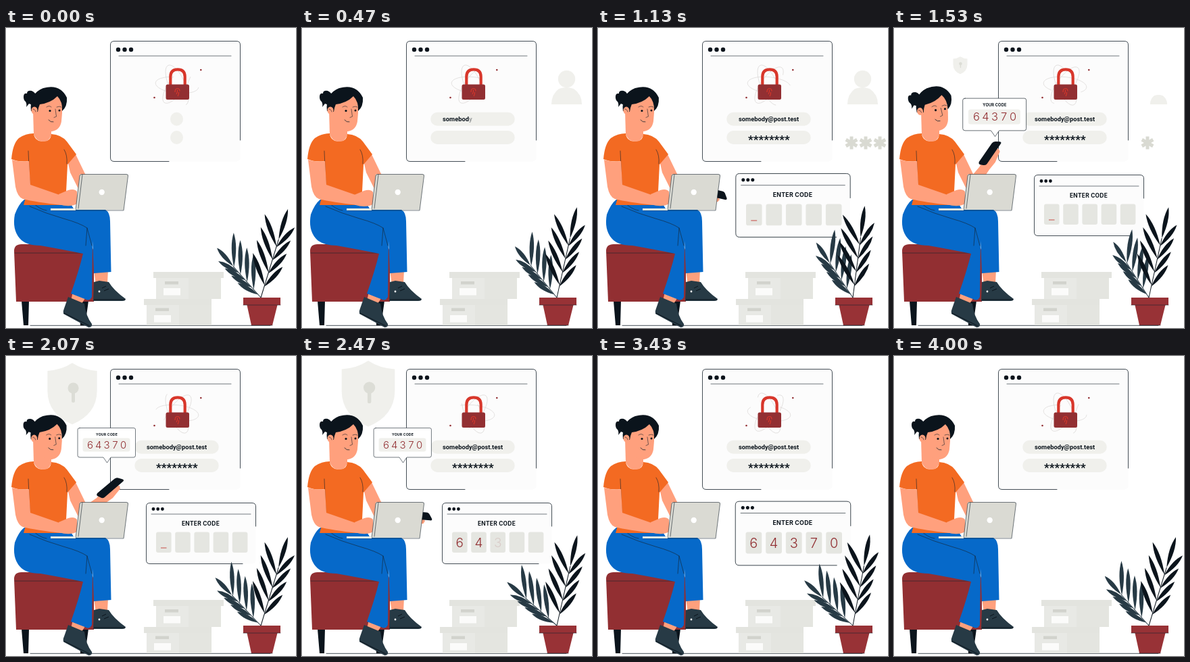
An HTML page for the animation above (4030 ms loop, 429 by 444 pixels).

```html
<!DOCTYPE html>
<html lang="en">
<head>
<meta charset="utf-8">
<title>Two-step sign in</title>
<style>
  html, body { margin: 0; width: 100%; height: 100%; overflow: hidden; background: #fff; }
  svg { display: block; width: 429px; height: 444px; }
  .line { fill: none; stroke: #17232c; stroke-width: .8; stroke-linecap: round; stroke-linejoin: round; }
  .fine { stroke-width: .6; }
  .ink { fill: #0b141c; }
  .skin { fill: #ffa07d; }
  .shirt { fill: #f36a22; }
  .jeans { fill: #0669c9; }
  .shoe { fill: #273a45; }
  .red { fill: #922f32; }
  .soft { fill: #f0f0ec; }
  .cell { fill: #e5e6e1; }
  .title { font: 700 8.4px Inter, "Open Sans", sans-serif; letter-spacing: .03em; fill: #0b141c; text-anchor: middle; }
  .field { font: 700 9.3px Roboto, Inter, sans-serif; fill: #0b141c; }
  .stars { font-size: 17px; }
  .digit { font: 300 15px Inter, Lato, sans-serif; fill: #922f32; text-anchor: middle; }
</style>
</head>
<body>
<svg viewBox="0 0 429 444" xmlns="http://www.w3.org/2000/svg">
  <path class="line" d="M36 440.3H391"/>

  <g id="shield">
    <path class="soft" d="M98 10.500Q114 21 134.500 22V52Q134 86 98 101Q62 86 61.500 52V22Q82 21 98 10.500Z"/>
    <circle cx="99.500" cy="47.500" r="8" fill="#dcddd6"/>
    <rect x="97" y="52" width="5" height="17" rx="2.500" fill="#dcddd6"/>
  </g>

  <circle id="userHead" class="soft" cx="391.500" cy="75.500" r="12.700"/>
  <path id="userBody" class="soft" d="M369 113Q369 98 380 90Q391 86 402 90Q414 98 414 113Z"/>
  <g id="bigStars" fill="none" stroke="#d9dad2" stroke-width="5"></g>

  <g id="login">
    <rect x="154.500" y="19.500" width="192" height="178" rx="5" fill="#fcfcfc"/>
    <path class="line" d="M241 197.500H160Q154.500 197.500 154.500 192V25Q154.500 19.500 160 19.500H341Q346.500 19.500 346.500 25V166"/>
    <path class="line fine" d="M167 41.300H333"/>
    <g class="ink"><circle cx="166" cy="32" r="3.200"/><circle cx="175.500" cy="32" r="3.200"/><circle cx="185" cy="32" r="3.200"/></g>
    <g id="orbits" fill="none" stroke="#d6d3d1" stroke-width=".6"></g>
    <circle class="red" cx="288.300" cy="62" r="1.300"/><circle class="red" cx="219.500" cy="103" r="1.300"/>
    <path d="M243.300 85V72Q243.300 61.300 254 61.300T264.700 72V85" fill="none" stroke="#d8372b" stroke-width="4.200"/>
    <rect class="red" x="236.500" y="83.500" width="34.500" height="22.500" rx="2.500"/>
    <path d="M250 95Q250 89.500 253.500 89.500T257 93.500M252 98Q254 95 253.500 91.500M254 101Q256 98 255.500 95" fill="none" stroke="#d8372b" stroke-width="1.200"/>
    <rect id="pill0" class="soft" y="124.700" height="20" rx="10"/>
    <rect id="pill1" class="soft" y="152" height="20" rx="10"/>
    <text id="mail" class="field" x="208" y="138"></text>
    <text id="stars" class="field stars" x="222" y="171"></text>
  </g>

  <g id="codePanel">
    <rect x="207.500" y="217.500" width="162" height="90" rx="5" fill="#fcfcfc"/>
    <path class="line" d="M350 307.500H213Q207.500 307.500 207.500 302V223Q207.500 217.500 213 217.500H364Q369.500 217.500 369.500 223V252"/>
    <path class="line fine" d="M215 234H362"/>
    <g class="ink"><circle cx="218" cy="226.500" r="2.400"/><circle cx="224.700" cy="226.500" r="2.400"/><circle cx="231.400" cy="226.500" r="2.400"/></g>
    <text class="title" x="288" y="250.700">ENTER CODE</text>
    <g id="cells"></g>
    <path id="cursor" d="M229 284H237.500" stroke="#c23b35" stroke-width=".9"/>
  </g>

  <g fill="#e8e9e5">
    <path d="M222 369H318V401H222Z"/><path d="M208 409H304V440H208Z"/>
    <path d="M270 369H318V401H270ZM256 409H304V440H256Z" fill="#e4e5e0"/>
    <path d="M218 361H322V370H218ZM204 401H304V410H204Z" fill="#e3e4df"/>
    <path d="M235 375H255V379.500H235ZM221 414.500H241V419H221Z" fill="#d2d3cd"/>
    <path d="M233 385H258V395.500H233ZM219 425H244V435.500H219Z" fill="#fbfbfa"/>
  </g>

  <g id="slateFrond"></g>
  <g id="blackFrond"></g>
  <path d="M356 408H402L394 440H363Z" fill="#983236"/>
  <path d="M351 399H406V410H351Z" fill="#983236"/>
  <path class="line fine" d="M351 410H406M363 440H394"/>

  <path class="ink" d="M23 404H34L33 440H26ZM108 404H122L117 440H110Z"/>
  <path class="red" d="M12 330Q12 320 23 320H118Q130 322 130 334V405H15Z"/>
  <path class="line fine" d="M13 333H112"/>

  <path class="skin" d="M88 183L103 187L118 218L108 240L95 214Z"/>
  <g id="phoneArm">
    <path class="skin" d="M104 232L127 205L134 190L145 180L155 179L157 183L150 199L141 210L118 244Z"/>
    <path class="ink" d="M126 198L145 171Q147 168 151 168.300L157 168.500Q160 169 158 172L138 201Q136 204 132 203L127 202Q125 201 126 198Z"/>
    <path d="M149 189L154 183M145 195L150 190M141 201L146 196" stroke="#ffa07d" stroke-width="3.500" stroke-linecap="round"/>
  </g>

  <path class="skin" d="M130 358H151L150 378L133 381ZM99 390L119 397L112 408L96 404Z"/>
  <path class="shoe" d="M130 376L138 374L152 376Q159 388 177 401Q177 404 172 404H129Z"/>
  <path class="shoe" d="M92 398L116 408Q118 426 127 438Q128 443 122 443L85 423Q84 419 86 415Z"/>
  <path d="M130 402H176M86 422L124 441M142 385L148 382M145 389L152 386" stroke="#0b141c" fill="none" stroke-width="1"/>
  <circle cx="138" cy="390" r="1.400" fill="#fff"/>
  <path class="jeans" d="M27 254H92L101 269H147Q154 273 154 286L155.500 361L130 363L128 315L127 398Q124 404 119 402L96 393Q107 362 114 334Q85 328 51 322Q29 322 20 311Q9 298 13 276Q19 260 27 254Z"/>
  <path class="line fine" d="M35 264Q60 275 85 282T120 296L127 322M38 257Q50 269 60 270M120 296L118 322"/>

  <path class="skin" d="M40 122H67V158Q64 169 54 168T41 157Z"/>
  <path class="shirt" d="M41 156Q42 167 54 168T67 157Q82 158 90 168L104 187L91 202L88 262H26L34 233L33 197Q20 199 8 194Q10 171 19 163Q29 156 41 156Z"/>
  <path class="line fine" d="M33 182L35 230M86 180Q91 188 90 201"/>
  <path class="skin" d="M9 195Q22 199 34 197L36 232L82 248V262Q45 258 25 253Q17 250 14 235Z"/>
  <path id="hand" class="skin" d="M78 246L92 240Q101 237 105 242V260Q95 266 78 261Z"/>

  <g id="head">
    <path class="ink" d="M26 102Q26 96 31 97Q31 92 38 93Q44 95 45 103L42 110Q40 115 34 112L30 117Q31 112 29 109Q26 107 26 102Z"/>
    <path class="skin" d="M41 113L80 99Q85 113 82 138Q80 151 68 153Q53 153 46 141Z"/>
    <path class="ink" d="M37 123Q34 97 55 89Q80 82 90 103Q91 116 83 123Q84 109 76 101Q66 111 50 113Q48 117 47 124Z"/>
    <ellipse class="skin" cx="42" cy="122" rx="4.500" ry="5.500"/>
    <path class="line fine" d="M60 117Q64 114 67 117M75 117Q79 115 82 117M73 120L74.500 131L71 132.500M40 120Q43 120 44 124"/>
    <path class="line" d="M63 136Q66 140 70 139"/>
    <circle class="ink" cx="65" cy="122.500" r="1.600"/><circle class="ink" cx="79" cy="122" r="1.500"/>
  </g>

  <path d="M109 216.500H178Q181 216.500 180.500 219L174 269H103Z" fill="#dadad3"/>
  <path class="line fine" d="M103 269L109 219Q109.500 216.500 112 216.500H178Q181 216.500 180.500 219L174 270H67"/>
  <path class="line fine" d="M107 267L113 217"/>
  <path d="M66 267H103V270H66Z" fill="#e9e9e5"/>
  <circle cx="141.700" cy="243" r="4.200" fill="#fff"/>

  <g id="bubble">
    <path class="line fine" style="fill:#fff" d="M109 106.500H189Q191.500 106.500 191.500 109V147Q191.500 150 189 150H155L149.500 158L144 150H109Q106 150 106 147V109Q106 106.500 109 106.500Z"/>
    <text class="title" style="font-size:5.200px" x="149" y="117.500">YOUR CODE</text>
    <rect class="soft" x="113.500" y="121.500" width="70" height="20" rx="3"/>
    <g id="bubbleDigits"></g>
  </g>
</svg>
<script>
  const LOOP = 4030, CODE = "64370";
  const $ = id => document.getElementById(id);
  const clamp = v => Math.min(1, Math.max(0, v));
  const progress = (t, from, to) => clamp((t - from) / (to - from));
  const smooth = p => p * p * (3 - 2 * p);
  const backIn = (p, c) => (c + 1) * p ** 3 - c * p * p;
  const backOut = (p, c) => 1 - backIn(1 - p, c);

  function add(parent, tag, attrs, text = "") {
    const node = document.createElementNS("http://www.w3.org/2000/svg", tag);
    for (const key in attrs) node.setAttribute(key, attrs[key]);
    node.textContent = text;
    return parent.appendChild(node);
  }

  function scaleAt(node, x, y, s) {
    node.style.display = s > 0.01 ? "" : "none";
    node.setAttribute("transform", `translate(${x} ${y}) scale(${s}) translate(${-x} ${-y})`);
  }

  const rotateAt = (node, angle, x, y) => node.setAttribute("transform", `rotate(${angle} ${x} ${y})`);

  // Pop in during [a, b], pop out during [c, d].
  function pop(t, a, b, c, d, strength = 1.7) {
    return t < c ? backOut(progress(t, a, b), strength) : 1 - backIn(progress(t, c, d), strength);
  }

  // A smooth closed curve through [time, value] points.
  function cyclic(points, t) {
    const n = points.length;
    const at = i => [points[(i + n) % n][0] + LOOP * Math.floor(i / n), points[(i + n) % n][1]];
    const i = points.findLastIndex(p => p[0] <= t);
    const [a, b, c, d] = [at(i - 1), at(i), at(i + 1), at(i + 2)];
    const span = c[0] - b[0], p = (t - b[0]) / span;
    const m = (c[1] - a[1]) / (c[0] - a[0]) * span, k = (d[1] - b[1]) / (d[0] - b[0]) * span;
    return b[1] * (1 + 2 * p) * (1 - p) ** 2 + m * p * (1 - p) ** 2 + c[1] * p * p * (3 - 2 * p) + k * p * p * (p - 1);
  }

  // Leaves are [lowest, highest, length, angle] per side, measured along an upright stem.
  function buildFrond(group, color, { stem, pairs, left, right, top }) {
    const leaf = (y, length, angle) => add(group, "path", {
      d: `M0 0Q6.500 ${-length * 0.6} 0 ${-length}Q-6.500 ${-length * 0.6} 0 0Z`,
      transform: `translate(0 ${-y}) rotate(${angle})`, fill: color
    });
    add(group, "path", { d: `M0 0V${-stem}`, stroke: color, "stroke-width": 1 });
    for (const [low, high, length, angle] of [left, right])
      for (let i = 0; i < pairs; i++) leaf(low + (high - low) * i / (pairs - 1), length, angle);
    leaf(stem, top, 0);
  }

  function typed(node, text) {
    return [...text].map(ch => add(node, "tspan", {}, ch));
  }
  function reveal(chars, t, start, step) {
    chars.forEach((ch, i) => ch.setAttribute("fill-opacity", progress(t, start + i * step, start + (i + 1) * step)));
  }

  buildFrond($("blackFrond"), "#0b141c", { stem: 90, pairs: 4, left: [19, 79, 51, -37], right: [17, 78, 40, 26], top: 47 });
  buildFrond($("slateFrond"), "#273a45", { stem: 62, pairs: 4, left: [6, 49, 35, -19], right: [16, 60, 51, 41], top: 36 });

  const mail = typed($("mail"), "somebody@post.test");
  const stars = typed($("stars"), "********");

  const orbits = [0, 60, 120].map(angle => add($("orbits"), "ellipse", {
    cx: 253, cy: 84.5, rx: 32, ry: 12, pathLength: 100, "stroke-dasharray": "70 30", transform: `rotate(${angle + 6} 253 84.5)`
  }));

  const bigStars = [375, 396, 417].map(x => {
    const group = add($("bigStars"), "g", {});
    for (const a of [0, 60, 120]) add(group, "path", { d: `M${x} 160.500V179.500`, transform: `rotate(${a} ${x} 170)` });
    return { group, x };
  });

  const digits = [...CODE].map((ch, i) => {
    const x = 233.300 + 28.200 * i;
    add($("cells"), "rect", { class: "cell", x: x - 11.300, y: 260.500, width: 22.600, height: 30.500, rx: 3 });
    add($("bubbleDigits"), "text", { class: "digit", x: 124.500 + 12.300 * i, y: 136.800 }, ch);
    return add($("cells"), "text", { class: "digit", style: "font-size:19px", x, y: 282.500 }, ch);
  });

  const SLATE_SWAY = [[0, 0], [470, 2.2], [1130, 7.8], [1470, 9.7], [2070, -2], [2550, -8], [2970, -9.5], [3500, -5]];
  const PHONE_TURN = [[1000, 80], [1130, 68], [1500, 0], [1620, -2], [2070, 15], [2250, 15], [2600, 80]];

  function track(points, t) {
    const i = points.findIndex(p => p[0] > t);
    if (i < 1) return points[i < 0 ? points.length - 1 : 0][1];
    const [a, b] = [points[i - 1], points[i]];
    return a[1] + (b[1] - a[1]) * smooth(progress(t, a[0], b[0]));
  }

  function draw(t) {
    const sway = 12 + 5 * Math.cos(4 * Math.PI * t / LOOP);
    $("blackFrond").setAttribute("transform", `translate(377 399) rotate(${sway})`);
    $("slateFrond").setAttribute("transform", `translate(377 399) rotate(${cyclic(SLATE_SWAY, t) - 41.5})`);

    const width = 19 + 105.500 * smooth(progress(t, 0, 330));
    for (const id of ["pill0", "pill1"]) {
      $(id).setAttribute("x", 252.500 - width / 2);
      $(id).setAttribute("width", width);
    }
    reveal(mail, t, 250, 30);
    reveal(stars, t, 780, 32);
    orbits.forEach((o, i) => o.setAttribute("stroke-dashoffset", -100 * t / LOOP * (i % 2 ? -1 : 1) - 30 * i));

    scaleAt($("userBody"), 391.500, 113, smooth(progress(t, 80, 300)) * (1 - smooth(progress(t, 1430, 1650))));
    scaleAt($("userHead"), 391.500, 75.500, smooth(progress(t, 200, 420)) * (1 - smooth(progress(t, 1340, 1500))));
    bigStars.forEach(({ group, x }, i) => scaleAt(group, x, 170,
      smooth(progress(t, 600 + 120 * i, 760 + 120 * i)) * (1 - smooth(progress(t, 1540 - 130 * i, 1650 - 130 * i)))));

    scaleAt($("codePanel"), 288.500, 262.500, pop(t, 850, 1350, 3270, 3730, 1.2));
    $("cursor").style.display = t < 2220 ? "" : "none";
    digits.forEach((d, i) => d.setAttribute("fill-opacity", progress(t, 2220 + 120 * i, 2300 + 120 * i)));

    scaleAt($("shield"), 98, 55, pop(t, 1490, 2100, 2325, 2825));
    scaleAt($("bubble"), 149.500, 131, pop(t, 1300, 1720, 2250, 2600));

    $("phoneArm").style.display = t > 1080 && t < 2600 ? "" : "none";
    rotateAt($("phoneArm"), track(PHONE_TURN, t), 112, 235);
    rotateAt($("head"), -5.500 * smooth(progress(t, 1100, 1480)) * (1 - smooth(progress(t, 1620, 2170))), 55, 158);
    const tap = t < 1070 ? Math.sin(t / 1070 * Math.PI * 10) * 0.800 : 0;
    $("hand").setAttribute("transform", `translate(0 ${tap})`);
  }

  function frame() {
    draw(performance.now() % LOOP);
    requestAnimationFrame(frame);
  }
  frame();
</script>
</body>
</html>
```
